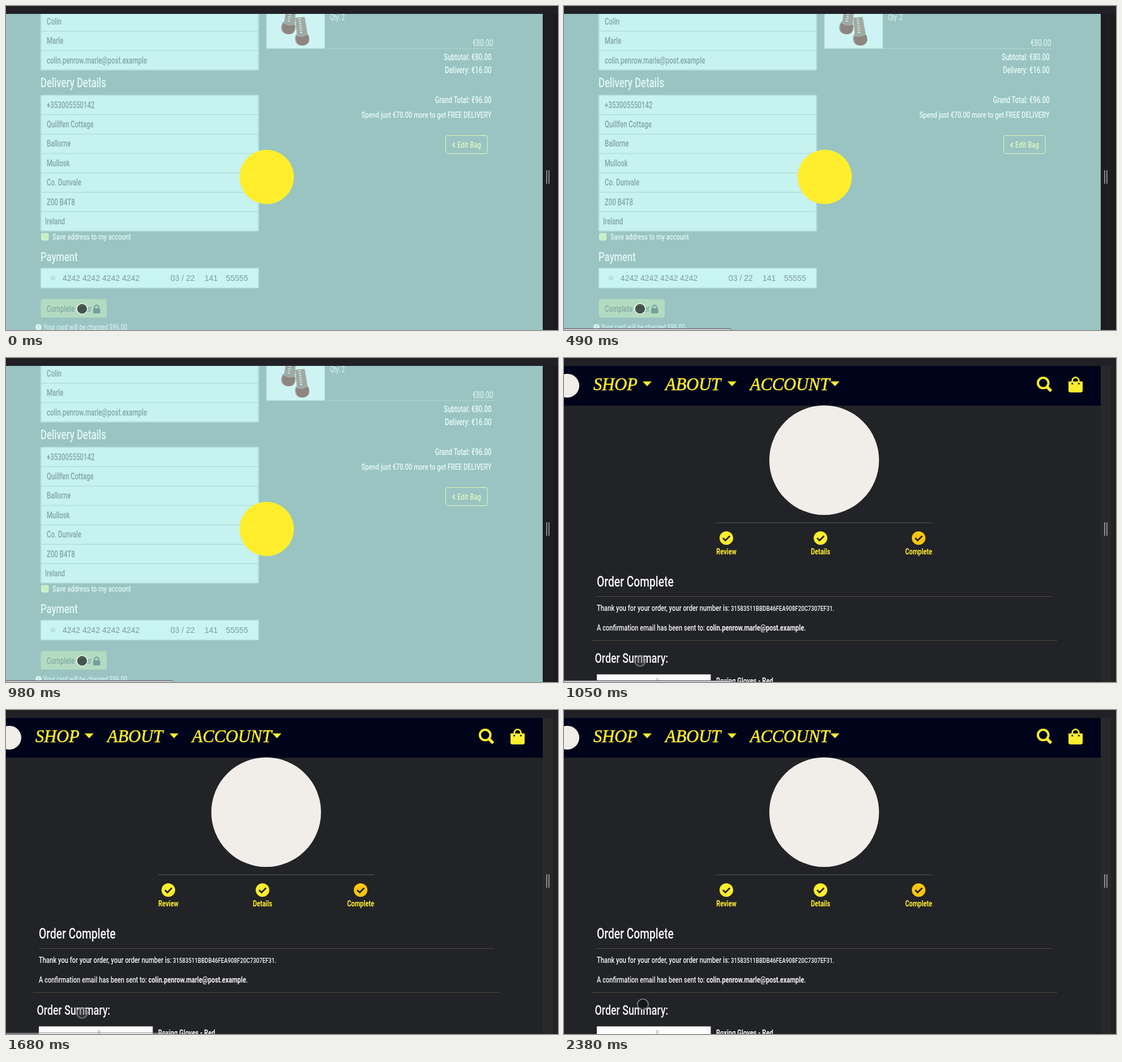
An HTML page for the animation above (2.45 s loop, 976 by 574 pixels).

```html
<!DOCTYPE html>
<html lang="en">
<head>
<meta charset="utf-8">
<title>Checkout</title>
<style>
  html, body { margin: 0; width: 100%; height: 100%; overflow: hidden; background: #222327; }
  svg { display: block; width: 100%; height: 100%; }
  text { font-family: Roboto, "Open Sans", sans-serif; white-space: pre; }
  .card text { font-family: "Liberation Sans", Arial, sans-serif; font-size: 14px; fill: #7f9b9c; }
  .nav text { font: italic 30.5px "Liberation Serif", "Times New Roman", serif; fill: #ffee2e; stroke: #ffee2e; stroke-width: .6; }
</style>
</head>
<body>
<svg id="stage" viewBox="0 0 976 574"></svg>
<script>
const LOOP = 2450, CUT = 1050, MOVE = 2380;
const YELLOW = '#ffee2e', PALE = '#e0f8f5', INK = '#82a5a4', LIME = '#e0f7bd', WHITE = '#f6f6f6';
const EMAIL = 'colin.penrow.marle@post.example';
const CONDENSE = 0.73; // one condensed face for all interface text

const rect = (x, y, w, h, fill, extra = '') =>
  `<rect x="${x}" y="${y}" width="${w}" height="${h}" fill="${fill}" ${extra}/>`;
const circle = (x, y, r, fill, extra = '') =>
  `<circle cx="${x}" cy="${y}" r="${r}" fill="${fill}" ${extra}/>`;
const path = (d, fill, extra = '') => `<path d="${d}" fill="${fill}" ${extra}/>`;
const line = (x1, x2, y, color) => path(`M${x1} ${y}H${x2}`, 'none', `stroke="${color}"`);
const plain = (x, y, str) => `<text x="${x}" y="${y}">${str}</text>`;
const label = (x, y, str, size, fill, weight = 500, anchor = 'start') =>
  `<g transform="translate(${x} ${y}) scale(${CONDENSE} 1)"><text font-size="${size}" fill="${fill}" font-weight="${weight}" text-anchor="${anchor}">${str}</text></g>`;

function fields(top, step, names) {
  const h = step * names.length;
  let out = rect(61.5, top, 385, h, '#c6f2f0', 'rx="2" stroke="#b0dcda" stroke-width="2"');
  names.forEach((name, i) => {
    const y = top + i * step;
    if (i) out += line(62, 446, y, '#a8d5d3');
    out += label(name === 'Ireland' ? 69 : 72, y + 22.5, name, 15.7, INK);
  });
  return out;
}

function glove(x, y, angle) {
  return `<g transform="translate(${x} ${y}) rotate(${angle})">` +
    path('M-9 -28H8L10 2Q15 20 2 22Q-13 23 -13 10Q-13 4 -9 0Z', '#a0aaa5') +
    path('M-11 4Q0 9 11 4Q15 20 2 22Q-13 23 -11 4Z', '#8e8580') +
    path('M-1 -26V2', 'none', 'stroke="#c4e2df" stroke-width="4" stroke-dasharray="2 2"') + '</g>';
}

function checkout() {
  const totals = [[96, 'Subtotal: €80.00'], [119, 'Delivery: €16.00'], [172, 'Grand Total: €96.00']];
  return rect(0, 0, 976, 574, '#99c4c2') +
    fields(10.2, 34.4, ['Colin', 'Marle', EMAIL]) +
    label(61, 144, 'Delivery Details', 23, PALE) +
    fields(158, 34.4, ['+353005550142', 'Quillfen Cottage', 'Ballorne', 'Mullosk', 'Co. Dunvale', 'Z00 B4T8', 'Ireland']) +
    rect(62, 402, 13.5, 13.5, '#c9efc9', 'rx="3"') +
    label(82, 414, 'Save address to my account', 15.1, PALE) +
    label(61, 452, 'Payment', 22.8, PALE) +
    rect(61.5, 464.5, 385, 35, '#c8f4f1', 'stroke="#b0dcda" stroke-width="1.5"') +
    rect(79, 478, 8, 8, '#b9e2e1') +
    '<g class="card">' + plain(100, 487, '4242 4242 4242 4242') + plain(291, 487, '03 / 22') +
    plain(351, 487, '141') + plain(389, 487, '55555') + '</g>' +
    rect(61.5, 519, 116.5, 33, '#b3dbc1', 'rx="4"') +
    label(72, 542, 'Complete order', 15.7, '#83aca4') +
    rect(154, 535.5, 12.5, 9, '#74a09b', 'rx="1.5"') +
    path('M156.5 536V534a3.7 3.7 0 0 1 7.4 0V536', 'none', 'stroke="#74a09b" stroke-width="2"') +
    circle(57.5, 569, 5.5, PALE) + path('M57.5 565.5v4M57.5 571v1.5', 'none', 'stroke="#99c4c2" stroke-width="1.6"') +
    label(66, 574, 'Your card will be charged $96.00', 13.9, '#d0eeee') +
    rect(460.5, 10, 103, 65.5, '#cdf4f2') + glove(501, 28, 8) + glove(523, 48, -6) +
    line(460, 862, 75.5, '#b2d5d3') +
    label(573, 25, 'Qty: 2', 14, PALE, 400) +
    label(861.5, 70.5, '€80.00', 16.3, PALE, 400, 'end') +
    totals.map(([y, str]) => label(858.5, y, str, 15.7, '#e9fbf8', 500, 'end')).join('') +
    label(858.5, 198, 'Spend just €70.00 more to get FREE DELIVERY', 15.2, '#e9fbf8', 500, 'end') +
    rect(777.5, 229.5, 73.5, 32, 'none', `rx="3" stroke="${LIME}"`) +
    path('M793.5 242.5L790 246.2L793.5 250', 'none', `stroke="${LIME}" stroke-width="2"`) +
    label(798, 251, 'Edit Bag', 15.5, LIME) +
    circle(461, 302.8, 48, YELLOW);
}

function step(x, name, fill) {
  return circle(x, 319, 12, fill) +
    path(`M${x - 6} 319l4.3 4.2l8 -8`, 'none', 'stroke="#222327" stroke-width="2.8"') +
    label(x, 348, name, 15.1, YELLOW, 600, 'middle');
}

function receipt() {
  const menu = [[52, 'SHOP', 139], [179, 'ABOUT', 289], [329, 'ACCOUNT', 471]];
  return rect(0, 0, 976, 574, '#222327') +
    rect(0, 14, 949, 70.5, '#00041b') + circle(6, 49, 21, '#f1eeea') +
    '<g class="nav">' + menu.map(([x, str]) => plain(x, 57, str)).join('') + '</g>' +
    menu.map(m => path(`M${m[2]} 41.5h16l-8 8.5z`, YELLOW)).join('') +
    circle(847.2, 44.3, 9.3, 'none', `stroke="${YELLOW}" stroke-width="4"`) +
    path('M853.5 50.8L861.3 58.6', 'none', `stroke="${YELLOW}" stroke-width="5.2"`) +
    path('M892 41.5h25v16q0 3.5 -3.5 3.5h-18q-3.5 0 -3.5 -3.5z', YELLOW) +
    path('M898.7 45V40.2a5.8 5.8 0 0 1 11.6 0V45', 'none', `stroke="${YELLOW}" stroke-width="2.7"`) +
    circle(898.7, 45.5, 1.4, '#00041b') + circle(910.3, 45.5, 1.4, '#00041b') +
    circle(460, 181, 97, '#f1eeea') +
    line(269.5, 651, 292, '#59595a') +
    step(287, 'Review', YELLOW) + step(453.5, 'Details', YELLOW) + step(627, 'Complete', '#ffc60c') +
    label(58, 405, 'Order Complete', 26.4, WHITE) +
    line(58, 862, 422.5, '#4d4936') +
    label(58, 448, 'Thank you for your order, your order number is:', 15.4, WHITE) +
    label(295, 448, '31583511BBDB46FEA908F20C7307EF31.', 13.3, WHITE) +
    label(58, 482.5, `A confirmation email has been sent to: <tspan font-weight="700">${EMAIL}</tspan>.`, 15.2, WHITE) +
    line(48, 872, 500.5, '#4d4936') +
    label(54.5, 540, 'Order Summary:', 24.4, WHITE) +
    rect(58, 560.5, 201.5, 14, '#fdfdfd') + rect(162.5, 566.5, 4.5, 10, '#d5d5d8', 'rx="2"') +
    label(269, 576.5, 'Boxing Gloves - Red', 15.3, WHITE, 600);
}

document.getElementById('stage').innerHTML =
  `<g id="checkout">${checkout()}</g><g id="receipt">${receipt()}</g>` +
  `<g id="status">${path('M-2 571.5H292q4 0 4 5H-2z', '#c9c9d2', 'stroke="#56585c"')}</g>` +
  rect(0, 0, 976, 14, '#212125') +
  rect(949, 14, 18, 560, '#29292c', 'id="gutter"') + rect(967, 14, 9, 560, '#222225', 'id="edge"') +
  path('M956 291V315M960 291V315', 'none', 'stroke="#b5b5b6" stroke-width="1.4"') +
  circle(0, 0, 9.5, '#000', 'id="cursor" stroke-width="1.7"');

const el = id => document.getElementById(id);
const set = (id, attrs) => Object.entries(attrs).forEach(([k, v]) => el(id).setAttribute(k, v));
const ramp = (t, a, b) => Math.min(1, Math.max(0, (t - a) / (b - a)));

function draw(t) {
  const paid = t >= CUT, moved = t >= MOVE;
  set('checkout', { display: paid ? 'none' : 'inline' });
  set('receipt', { display: paid ? 'inline' : 'none' });
  set('gutter', { fill: paid ? '#29292c' : '#1e1e21' });
  set('edge', { fill: paid ? '#222225' : '#1b1b1f' });
  set('status', { opacity: ramp(t, 210, 350) * (1 - ramp(t, 1540, 1820)) });
  set('cursor', {
    transform: moved ? 'translate(139.5 521.5)' : 'translate(134.5 536.5)',
    fill: paid && !moved ? '#4a4a4e' : '#0a0f0e',
    'fill-opacity': paid && !moved ? 0.4 : 0.62,
    stroke: paid ? '#85858a' : '#e4f3ec'
  });
}

const start = performance.now();
function tick() {
  draw((performance.now() - start) % LOOP);
  requestAnimationFrame(tick);
}
tick();
</script>
</body>
</html>
```
